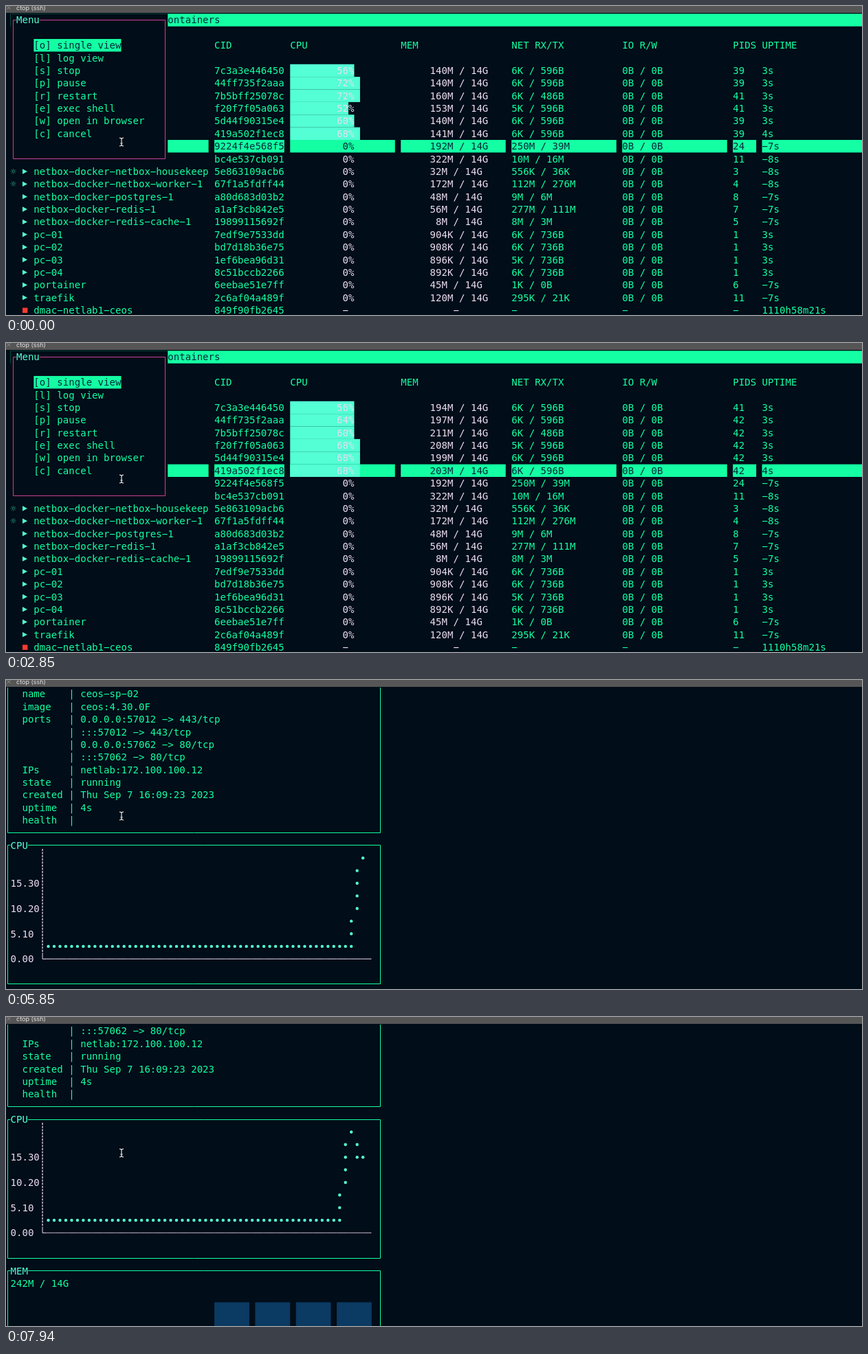
An HTML page with a canvas that plays this animation: 1245 by 450 pixels, repeating every 8 s.

```html
<!DOCTYPE html>
<html lang="en">
<head>
<meta charset="utf-8">
<title>Container monitor</title>
<style>
  html, body { margin: 0; width: 100%; height: 100%; overflow: hidden; background: #010d18; }
  canvas { display: block; }
</style>
</head>
<body>
<canvas id="stage" width="1245" height="450"></canvas>
<script>
const ctx = document.getElementById('stage').getContext('2d');
const W = 1245, H = 450, LOOP = 8000;
const CELL_W = 8.474, CELL_H = 18.37;
const BG = '#010d18', GREEN = '#14ffa3', CYAN = '#54ffd5', PALE = '#eadcf2',
      DARK = '#04293a', PINK = '#c9429c', BLUE = '#0b3a63', RED = '#ff3b30';

// Terminal grid: left edge of a column, top and middle of a row.
const colX = c => -2 + c * CELL_W;
const midX = c => colX(c + 0.5);
const rowY = r => 11.3 + r * CELL_H;
const midY = r => rowY(r + 0.5);

function text(str, col, row, color = GREEN) {
  ctx.fillStyle = color;
  [...str.replace(/-/g, '\u2212')].forEach((ch, i) => {
    if (ch !== ' ') ctx.fillText(ch, colX(col + i), midY(row) + 5);
  });
}

function fillCells(col, row, cols, rows, color) {
  ctx.fillStyle = color;
  ctx.fillRect(colX(col), rowY(row), cols * CELL_W, rows * CELL_H);
}

function line(points, color, dash = [], width = 1) {
  ctx.strokeStyle = color;
  ctx.lineWidth = width;
  ctx.setLineDash(dash);
  ctx.beginPath();
  points.forEach(([x, y]) => ctx.lineTo(x, y));
  ctx.stroke();
  ctx.setLineDash([]);
}

// Frame drawn through cell centres, with an optional title set into its top edge.
function frame(c0, r0, c1, r1, color, title = '') {
  const snap = v => Math.floor(v) + 0.5;
  const [l, r] = [midX(c0), midX(c1)].map(snap);
  const [t, b] = [midY(r0), midY(r1)].map(snap);
  if (!title) line([[l, t], [r, t], [r, b], [l, b], [l, t]], color);
  else {
    line([[colX(c0 + 1), t], [l, t], [l, b], [r, b], [r, t],
          [colX(c0 + 1 + title.length), t]], color);
    text(title, c0 + 1, r0, CYAN);
  }
}

// ---- container list ----
const COLUMNS = [
  ['NAME', 5, 30], ['CID', 36, 12], ['CPU', 49, 18], ['MEM', 68, 18],
  ['NET RX/TX', 87, 18], ['IO R/W', 106, 18], ['PIDS', 125, 4], ['UPTIME', 130, 20]
];
const BUSY = `ceos-lf-01|7c3a3e446450|6K / 596B|3s
ceos-lf-02|44ff735f2aaa|6K / 596B|3s
ceos-lf-03|7b5bff25078c|6K / 486B|3s
ceos-lf-04|f20f7f05a063|5K / 596B|3s
ceos-sp-01|5d44f90315e4|6K / 596B|3s
ceos-sp-02|419a502f1ec8|6K / 596B|4s`.split('\n').map(s => s.split('|'));
const IDLE = `influxdb|9224f4e568f5|192M|250M / 39M|24|-7s
netbox-docker-netbox-1|bc4e537cb091|322M|10M / 16M|11|-8s
netbox-docker-netbox-housekeep|5e863109acb6|32M|556K / 36K|3|-8s
netbox-docker-netbox-worker-1|67f1a5fdff44|172M|112M / 276M|4|-8s
netbox-docker-postgres-1|a80d683d03b2|48M|9M / 6M|8|-7s
netbox-docker-redis-1|a1af3cb842e5|56M|277M / 111M|7|-7s
netbox-docker-redis-cache-1|19899115692f|8M|8M / 3M|5|-7s
pc-01|7edf9e7533dd|904K|6K / 736B|1|3s
pc-02|bd7d18b36e75|908K|6K / 736B|1|3s
pc-03|1ef6bea96d31|896K|5K / 736B|1|3s
pc-04|8c51bccb2266|892K|6K / 736B|1|3s
portainer|6eebae51e7ff|45M|1K / 0B|6|-7s
traefik|2c6af04a489f|120M|295K / 21K|11|-7s`.split('\n').map(s => s.split('|'));
const STOPPED = ['dmac-netlab1-ceos', '849f90fb2645', '-', '-', '-', '-', '-', '1110h58m21s'];

const EARLY = { cpu: [56, 72, 72, 52, 60, 68], mem: [140, 140, 160, 153, 140, 141], pids: [39, 39, 41, 41, 39, 39] };
const LATER = { cpu: [56, 64, 60, 68, 68, 68], mem: [176, 179, 193, 190, 181, 185], pids: [41, 42, 42, 42, 42, 42] };
const LATEST = { ...LATER, mem: LATER.mem.map(m => m + 18) };

function tableRows({ cpu, mem, pids }) {
  const io = '0B / 0B';
  return [
    ...BUSY.map(([name, cid, net, up], i) =>
      [name, cid, cpu[i] + '%', mem[i] + 'M / 14G', net, io, '' + pids[i], up]),
    ...IDLE.map(([name, cid, m, net, p, up]) =>
      [name, cid, '0%', m + ' / 14G', net, io, p, up]),
    STOPPED
  ];
}

function statusMark(row, stopped) {
  const x = colX(3), y = midY(row);
  if (stopped) {
    ctx.fillStyle = RED;
    ctx.fillRect(x + 0.6, y - 3.5, 7.4, 7.4);
    return;
  }
  ctx.fillStyle = CYAN;
  ctx.beginPath();
  ctx.moveTo(x + 0.6, y - 3.7);
  ctx.lineTo(x + 7.6, y);
  ctx.lineTo(x + 0.6, y + 3.7);
  ctx.fill();
}

function drawList(stats, selected) {
  fillCells(1, 0, 150, 1, GREEN);
  text('ctop - 16:09:52 UTC   22 containers', 2, 0, DARK);
  COLUMNS.forEach(([title, col]) => text(title, col, 2));

  tableRows(stats).forEach((cells, i) => {
    const row = i + 4, active = i === selected;
    statusMark(row, cells === STOPPED);
    if (i >= 7 && i <= 9) text('☼', 1, row, '#2fb58f');
    cells.forEach((value, k) => {
      const [title, col, width] = COLUMNS[k];
      const gauge = title === 'CPU' || title === 'MEM';
      const load = title === 'CPU' ? parseInt(value) || 0 : 0;
      if (active) fillCells(col, row, width, 1, GREEN);
      if (load) fillCells(col, row, load < 54 ? 10 : load < 66 ? 11 : 12, 1, CYAN);
      const start = gauge ? col + 1 + Math.floor((width - value.length) / 2) : col;
      text(value, start, row, active && !load ? DARK : gauge ? PALE : GREEN);
    });
  });
}

const MENU = ['[o] single view', '[l] log view', '[s] stop', '[p] pause', '[r] restart',
              '[e] exec shell', '[w] open in browser', '[c] cancel'];

function drawMenu() {
  fillCells(1, 0, 27, 12, BG);
  frame(1, 0, 27, 11, PINK, 'Menu');
  fillCells(5, 2, MENU[0].length, 1, GREEN);
  MENU.forEach((item, i) => text(item, 5, 2 + i, i ? GREEN : DARK));
}

// ---- single container view ----
const INFLUX = [
  ['id', '9224f4e568f5'], ['name', 'influxdb'], ['image', 'influxdb:2.7-alpine'],
  ['ports', '0.0.0.0:8086 -> 8086/tcp'], ['', ':::8086 -> 8086/tcp'],
  ['IPs', 'traefik-network:172.18.0.4'], ['state', 'running'],
  ['created', 'Fri Apr 21 02:07:50 2023'], ['uptime', '-7s'], ['health', '']
];
const SPINE = [
  ['id', '419a502f1ec8'], ['name', 'ceos-sp-02'], ['image', 'ceos:4.30.0F'],
  ['ports', '0.0.0.0:57012 -> 443/tcp'], ['', ':::57012 -> 443/tcp'],
  ['', '0.0.0.0:57062 -> 80/tcp'], ['', ':::57062 -> 80/tcp'],
  ['IPs', 'netlab:172.100.100.12'], ['state', 'running'],
  ['created', 'Thu Sep 7 16:09:23 2023'], ['uptime', '4s'], ['health', '']
];
// Each sample is the span of chart rows it covers, counted down from the title.
const RISE = [[6, 8], [2, 5], [1, 1]];
const RISE_FALL = [...RISE, [2, 3], [3, 3]];

function drawChart(top, samples) {
  const axis = samples ? 6 : 5, x = midX(axis), base = midY(top + 9);
  const labels = samples ? ['15.30', '10.20', '5.10', '0.00'] : Array(4).fill('0.00');
  frame(0, top, 64, top + 11, GREEN, 'CPU');
  labels.forEach((label, i) => text(label, 1, top + 3 + 2 * i, PALE));
  line([[x, midY(top) + 5], [x, base - 9]], PALE, [3.1, 1.49], 1.3);
  line([[x, base - 9], [x, base], [x + 4, base]], PALE);
  line([[x + 4, base], [colX(63), base]], PALE, [1.4, CELL_W / 4 - 1.4], 1.3);
  if (!samples) return;

  ctx.fillStyle = CYAN;
  const first = 62 - samples.length;
  for (let col = 7; col < 62; col++) {
    const [from, to] = samples[col - first] || [8, 8];
    for (let r = from; r <= to; r++) {
      ctx.beginPath();
      ctx.arc(midX(col), midY(top + r), 2.2, 0, 7);
      ctx.fill();
    }
  }
}

function drawMemory(top, usage) {
  frame(0, top, 64, top + 11, GREEN, 'MEM');
  text(usage + ' / 14G', 1, top + 1);
  for (let col = 36; col < 63; col += 7) fillCells(col, top + 3, 6, 5, BLUE);
}

function drawDetail(fields, scroll = 0, samples = null, usage = '221M') {
  const bottom = fields.length + 1 - scroll;
  frame(0, -scroll, 64, bottom, GREEN);
  fields.forEach(([label, value], i) =>
    text(label.padEnd(8) + '| ' + value, 3, i + 1 - scroll));
  drawChart(bottom + 1, samples);
  drawMemory(bottom + 13, usage);
}

// ---- window chrome ----
function drawTitleBar() {
  ctx.fillStyle = '#565556';
  ctx.fillRect(0, 0, W, 10);
  ctx.font = '9px Inter, "Liberation Sans", sans-serif';
  ctx.fillStyle = '#e4e4e4';
  ctx.fillText('ctop (ssh)', 15, 5.5);
  line([[1.5, 0], [6.5, 5]], '#8b8b8b');
  line([[6.5, 0], [1.5, 5]], '#8b8b8b');
}

function drawPointer() {
  const x = 168, y = 198;
  for (const [color, width] of [['#10161c', 2.6], ['#f2f2f2', 1.1]]) {
    line([[x - 3, y - 6], [x - 1, y - 5.5], [x, y - 4.5], [x, y + 4.5], [x - 1, y + 5.5], [x - 3, y + 6]], color, [], width);
    line([[x + 3, y - 6], [x + 1, y - 5.5], [x, y - 4.5]], color, [], width);
    line([[x + 3, y + 6], [x + 1, y + 5.5], [x, y + 4.5]], color, [], width);
    line([[x - 1.5, y + 2], [x + 1.5, y + 2]], color, [], width);
  }
}

const SCENES = [
  [0, () => { drawList(EARLY, 6); drawMenu(); }],
  [750, () => drawDetail(INFLUX)],
  [1950, () => drawList(LATER, 6)],
  [2550, () => drawList(LATEST, 5)],
  [2850, () => { drawList(LATEST, 5); drawMenu(); }],
  [3750, () => drawDetail(SPINE)],
  [4950, () => drawDetail(SPINE, 1)],
  [5850, () => drawDetail(SPINE, 2, RISE)],
  [6150, () => drawDetail(SPINE, 3, RISE)],
  [6750, () => drawDetail(SPINE, 4, RISE)],
  [7350, () => drawDetail(SPINE, 4, RISE_FALL, '242M')],
  [7640, () => drawDetail(SPINE, 5, RISE_FALL, '242M')],
  [7790, () => drawDetail(SPINE, 6, RISE_FALL, '242M')],
  [7940, () => drawDetail(SPINE, 7, RISE_FALL, '242M')]
];

function render(scene) {
  ctx.fillStyle = BG;
  ctx.fillRect(0, 0, W, H);
  ctx.save();
  ctx.beginPath();
  ctx.rect(0, 11, W, H);
  ctx.clip();
  ctx.font = '14.08px "DejaVu Sans Mono", monospace';
  scene();
  ctx.restore();
  drawTitleBar();
  drawPointer();
}

const start = performance.now();
let shown = null;
function tick() {
  const t = (performance.now() - start) % LOOP;
  const scene = SCENES.findLast(([at]) => at <= t)[1];
  if (scene !== shown) render(shown = scene);
  requestAnimationFrame(tick);
}
tick();
</script>
</body>
</html>
```
